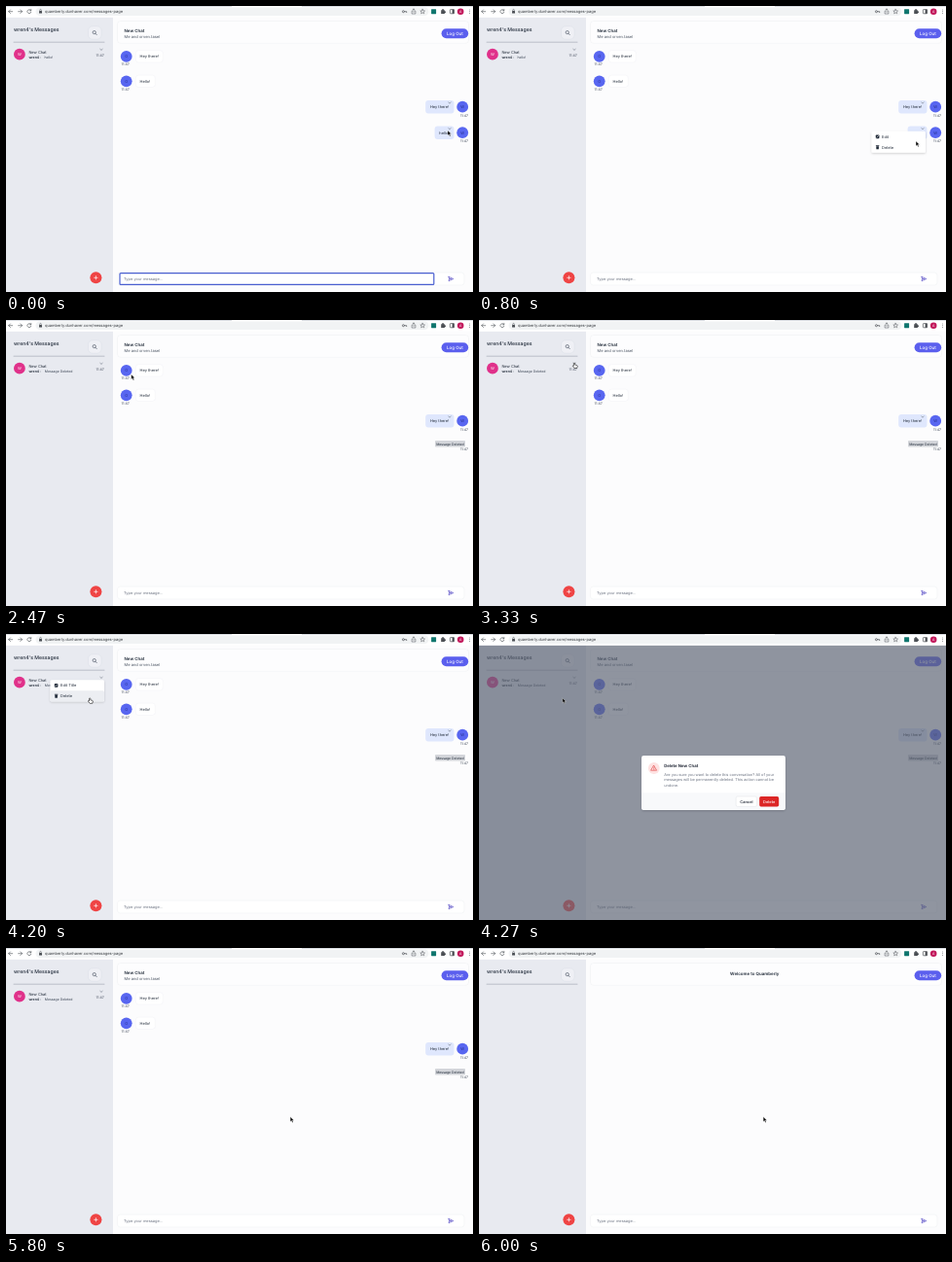
These frames come from a looping animation (480x294 px, 6790 ms). An HTML page:

```html
<!DOCTYPE html>
<html lang="en">
<head>
<meta charset="utf-8">
<title>Chat demo</title>
<style>
  html, body { margin: 0; width: 100%; height: 100%; overflow: hidden; background: #fff; }
  svg { display: block; width: 100vw; height: 100vh; }
  text { font-family: Inter, "Liberation Sans", sans-serif; text-rendering: geometricPrecision; white-space: pre; }
</style>
</head>
<body>
<svg id="stage" viewBox="0 0 480 294" xmlns="http://www.w3.org/2000/svg"></svg>
<script>
const LOOP = 6790;
const SITE = 'Quamberly', USER = 'wren4', FRIEND = 'orven.tasel';
const INK = '#1f2937', GRAY = '#6b7280', INDIGO = '#5b5fee', RED = '#ef4444';

// Markup helpers
const text = (x, y, str, size = 3.95, fill = INK, more = '') =>
  `<text x="${x}" y="${y}" font-size="${size}" fill="${fill}" ${more}>${str}</text>`;
const rect = (x, y, w, h, r, fill, more = '') =>
  `<rect x="${x}" y="${y}" width="${w}" height="${h}" rx="${r}" fill="${fill}" ${more}/>`;
const circle = (x, y, r, fill, more = '') =>
  `<circle cx="${x}" cy="${y}" r="${r}" fill="${fill}" ${more}/>`;
const line = (d, color, w = 0.6, fill = 'none') =>
  `<path d="${d}" fill="${fill}" stroke="${color}" stroke-width="${w}" stroke-linecap="round" stroke-linejoin="round"/>`;
const shape = (d, fill) => `<path d="${d}" fill="${fill}"/>`;
const at = (x, y, body) => `<g transform="translate(${x} ${y})">${body}</g>`;
const group = (id, body) => `<g id="${id}">${body}</g>`;

const MID = 'text-anchor="middle"';
const weight = w => `font-weight="${w}"`;
const soft = 'filter="url(#soft)"';

const avatar = (x, y, letter, fill, ink) =>
  circle(x, y, 5.9, fill) + text(x, y + 1.4, letter, 3.9, ink, MID);
const time = (x, y) => text(x, y, '11:47', 3.47, '#374151', MID);
const chevron = (x, y) => line(`M${x - 1.2} ${y - 0.5}l1.2 1.1l1.2-1.1`, '#4b5563', 0.5);

function received(y, str, w) {
  return avatar(123.7, y, 'O', '#5866f0', '#27318f') + time(122.6, y + 9.4) +
    rect(133.3, y - 6.2, w, 12.4, 3, '#fff', 'stroke="#f0f1f5" stroke-width=".5"') +
    text(137.6, y + 1.6, str);
}

function sent(y, str, x) {
  return avatar(469.2, y, 'W', '#5866f0', '#27318f') + time(470.9, y + 9.8) +
    rect(x, y - 6.6, 460.5 - x, 13.3, 3, '#dfe7fd') +
    text(x + 4.7, y + 1.6, str) + chevron(456, y - 4.1);
}

function menu(id, x, y, first) {
  const pencil = rect(-1.8, -1.8, 3.6, 3.6, 0.7, INK) + line('M-.8 .8L.9-.9', '#fff', 0.6);
  const trash = shape('M-1.7-1.9h3.4v.8h-3.4zM-1.4-.8h2.8l-.2 2.9h-2.4z', INK);
  return group(id,
    rect(x, y, 55.5, 22, 1.5, '#fff', soft) +
    rect(x, y + 11, 55.5, 11, 1.5, '#eceef2', `id="${id}Row"`) +
    at(x + 6.1, y + 5.7, pencil) + text(x + 10.6, y + 7.1, first) +
    at(x + 6.1, y + 16.4, trash) + text(x + 10.6, y + 17.9, 'Delete'));
}

function browserBar() {
  const dark = '#4b4f54';
  return rect(0, 0, 480, 11.6, 0, '#fff') +
    rect(0, 0, 232, 0.9, 0, '#d9dce1') + rect(304, 0, 176, 0.9, 0, '#d9dce1') +
    line('M6.7 5.7H2.7M4.5 3.9L2.7 5.7l1.8 1.8', dark) +
    line('M12.6 5.7h4M14.8 3.9l1.8 1.8l-1.8 1.8', dark) +
    line('M25.6 4.6A2 2 0 1 0 25.8 6.3M25.8 3.3v1.5h-1.5', dark) +
    rect(30.5, 1.6, 404, 8.4, 4.2, '#f1f3f4') +
    rect(34, 5, 3, 2.6, 0.4, dark) + line('M34.7 5V4.2a.8.8 0 0 1 1.6 0V5', dark, 0.5) +
    text(40, 7.2, `${SITE.toLowerCase()}.dunhaver.com/messages-page`, 4, '#33373c') +
    circle(408.4, 5.7, 1, 'none', `stroke="${dark}" stroke-width=".7"`) + line('M409.5 5.7h2.2v.9', dark, 0.7) +
    line('M417.6 5.1h-.5v2.9h3.8V5.1h-.5M419 6.4V3M418 3.9l1-1l1 1', dark, 0.5) +
    line('M428.2 3.3l.7 1.6l1.7.1l-1.3 1.1l.4 1.7l-1.5-.9l-1.5.9l.4-1.7l-1.3-1.1l1.7-.1z', dark, 0.5) +
    rect(437.1, 3.2, 5, 5, 0.4, '#0f766e') +
    shape('M447.2 4.2h1.1a.8.8 0 1 1 1.5 0h1.1v1.2a.8.8 0 1 1 0 1.5v1.2h-3.7z', dark) +
    rect(456.4, 3.6, 4.2, 4.2, 0.5, 'none', `stroke="${dark}" stroke-width=".7"`) + rect(458.6, 3.6, 2, 4.2, 0, dark) +
    circle(467.2, 5.7, 3.3, '#c2185b') + text(467.2, 7, 'A', 3.5, '#fff', MID) +
    [3.9, 5.7, 7.5].map(y => circle(476.6, y, 0.45, dark)).join('');
}

function page() {
  const card = 'stroke="#f0f1f4" stroke-width=".6"';
  return rect(0, 11.6, 480, 283, 0, '#fcfcfd') +
    rect(0, 11.6, 110, 283, 0, '#e8eaf0') +
    text(8, 26.4, `${USER}'s Messages`, 5.15, INK, weight(500)) +
    rect(84.5, 20.8, 13.6, 13.4, 4.5, '#eff0f5', 'stroke="#d9dce4" stroke-width=".5"') +
    circle(90.7, 27.1, 1.6, 'none', 'stroke="#374151" stroke-width=".6"') + line('M91.9 28.3l1.4 1.4', '#374151') +
    line('M8 37.2H101', '#9aa0ac', 0.6) +
    circle(92.4, 279.3, 6, RED) + line('M90.7 279.3h3.4M92.4 277.6v3.4', '#fff', 0.7) +
    rect(114.5, 15.5, 361, 22.8, 3, '#fdfdfe', card) +
    rect(447.6, 23.2, 27.6, 10, 5, INDIGO) +
    text(461.4, 29.8, 'Log Out', 4.5, '#fff', MID + weight(500)) +
    rect(114.5, 274, 356.5, 13, 3, '#fff', card) +
    group('focus', rect(117, 274.6, 322.8, 11.8, 1, '#fff', 'stroke="#4a5fd0" stroke-width="1.2"')) +
    group('caret', line('M120.8 278v5', INK, 0.4)) +
    text(121, 282.1, 'Type your message...', 3.97, GRAY) +
    line('M455 278.3l4.8 2.2l-4.8 2.2l.6-2.2zM455.6 280.5h2', '#5b50c8', 0.7);
}

function chat() {
  return avatar(13.9, 49.7, 'W', '#e0318a', '#fff') +
    text(23.4, 49.1, 'New Chat') +
    text(23.4, 54, USER + ' :', 3.47, INK, weight(600)) +
    group('lastHello', text(39.4, 54, 'hello!', 3.47, '#374151')) +
    group('lastDeleted', text(39.8, 54, 'Message Deleted', 3.47, '#374151')) +
    chevron(98, 44.8) + time(96.6, 52.3) +
    text(121.5, 27.1, 'New Chat', 4.45, INK, weight(600)) +
    text(121.5, 33.1, `Me and ${FRIEND}`, 4.05, '#4b5563') +
    received(51.8, 'Hey there!', 28) + received(77.3, 'Hello!', 20) +
    sent(103.7, 'Hey there!', 431.2) +
    group('hello', sent(130.2, 'hello!', 440.6)) +
    group('deleted', rect(441, 124, 31, 6.6, 0.8, '#d3d5da') +
      text(442.2, 128.5, 'Message Deleted', 3.47) + time(470.9, 134.3));
}

function dialog() {
  const body = [
    'Are you sure you want to delete this conversation? All of your',
    'messages will be permanently deleted. This action cannot be',
    'undone.'
  ];
  return rect(0, 11.6, 480, 283, 0, 'rgb(92,99,115)', 'fill-opacity=".68"') +
    rect(167, 125, 148, 56, 2.4, '#fff', soft) +
    shape('M167 163.3h148v15.3a2.4 2.4 0 0 1-2.4 2.4h-143.2a2.4 2.4 0 0 1-2.4-2.4z', '#f8f9fb') +
    circle(179.8, 138, 5.9, '#fee2e2') +
    line('M179.8 135.3l2.8 4.9h-5.6zM179.8 137.2v1.3M179.8 139.4v.05', '#dc2626', 0.55) +
    text(190.2, 137, 'Delete New Chat', 4.35, '#111827', weight(600)) +
    body.map((s, i) => text(190.2, 145.5 + i * 5.85, s, 3.91, GRAY)).join('') +
    rect(264.2, 167, 21.4, 10.4, 1.7, '#fff', 'stroke="#d8dbe0" stroke-width=".4"') +
    text(274.9, 173.5, 'Cancel', 3.98, '#111827', MID + weight(500)) +
    rect(288.2, 167, 20, 10.4, 1.7, '#dc2626', 'id="confirm"') +
    text(298.2, 173.5, 'Delete', 3.98, '#fff', MID + weight(500));
}

const pointer =
  group('ring', circle(0, 0.4, 8.6, 'rgba(255,255,255,.25)', 'stroke="#15171c" stroke-width="1.3"')) +
  group('arrow', `<path d="M0 0v5l1.2-1.1l.9 2l.9-.4l-.9-1.9h1.6z" fill="#000" stroke="#fff" stroke-width=".35"/>`) +
  group('hand', `<path d="M.3 0c.5 0 .7.3.7.7v1.4l2 .5c.5.1.6.5.5 1l-.5 1.9h-2.6l-1.7-2c-.3-.5.3-.9.8-.5l.2.2v-2.500c0-.4.2-.7.6-.7z" fill="#fff" stroke="#000" stroke-width=".55" stroke-linejoin="round"/>`);

document.getElementById('stage').innerHTML =
  '<defs><filter id="soft" x="-20%" y="-30%" width="140%" height="160%">' +
  '<feDropShadow dx="0" dy="1" stdDeviation="1.2" flood-color="#000" flood-opacity=".18"/></filter></defs>' +
  page() + group('chat', chat()) +
  group('welcome', text(283.2, 28.2, `Welcome to ${SITE}`, 4.45, INK, MID + weight(600))) +
  menu('msgMenu', 403.5, 128.7, 'Edit') + menu('chatMenu', 45.5, 47.2, 'Edit Title') +
  group('dialog', dialog()) + browserBar() + group('pointer', pointer);

const el = {};
document.querySelectorAll('[id]').forEach(n => el[n.id] = n);

// Visible time spans, in ms
const spans = {
  focus: [[0, 330]], caret: [[130, 330]],
  hello: [[0, 1600]], deleted: [[1600, LOOP]],
  lastHello: [[0, 1870]], lastDeleted: [[1870, LOOP]],
  msgMenu: [[400, 1600]], msgMenuRow: [[1070, 1600]],
  chatMenu: [[3530, 4270]], chatMenuRow: [[3860, 4270]],
  dialog: [[4270, 5800]],
  chat: [[0, 6000]], welcome: [[6000, LOOP]],
  ring: [[330, 400], [1470, 1600], [3470, 3530], [4130, 4200], [5670, 5800]],
  hand: [[130, 400], [1070, 1600], [2870, 3730], [3860, 4270], [5200, 5800]]
};

// Pointer path: time, x, y
const path = [
  [0, 454, 128], [130, 455, 128.6], [400, 455, 128.6], [1000, 447, 142.5], [1330, 443.5, 146],
  [2060, 443.5, 146], [2470, 128.7, 56], [2530, 128.7, 56], [2670, 79, 40], [2800, 97, 42],
  [3330, 97.7, 44], [3660, 97.7, 44], [3930, 85.8, 65.8], [4460, 85.8, 65.8],
  [5000, 301, 187], [5200, 298, 175], [5530, 292.2, 173.6], [LOOP, 292.2, 173.6]
];

function pointerAt(t) {
  const i = Math.max(1, path.findIndex(p => p[0] >= t));
  const [t0, x0, y0] = path[i - 1], [t1, x1, y1] = path[i];
  const u = (t - t0) / (t1 - t0), e = u * u * (3 - 2 * u);
  return [x0 + (x1 - x0) * e, y0 + (y1 - y0) * e];
}

const within = (t, list) => list.some(([a, b]) => t >= a && t < b);

function draw(ms) {
  const t = Math.round(Math.floor((ms + 4) * 0.015) * 100 / 15) * 10;
  for (const id in spans) el[id].style.display = within(t, spans[id]) ? '' : 'none';
  el.arrow.style.display = within(t, spans.hand) ? 'none' : '';
  el.confirm.setAttribute('fill', t >= 5270 ? RED : '#dc2626');
  const [x, y] = pointerAt(Math.min(t, LOOP));
  el.pointer.setAttribute('transform', `translate(${x.toFixed(2)} ${y.toFixed(2)})`);
}

const start = performance.now();
function tick() {
  draw((performance.now() - start) % LOOP);
  requestAnimationFrame(tick);
}
tick();
</script>
</body>
</html>
```
